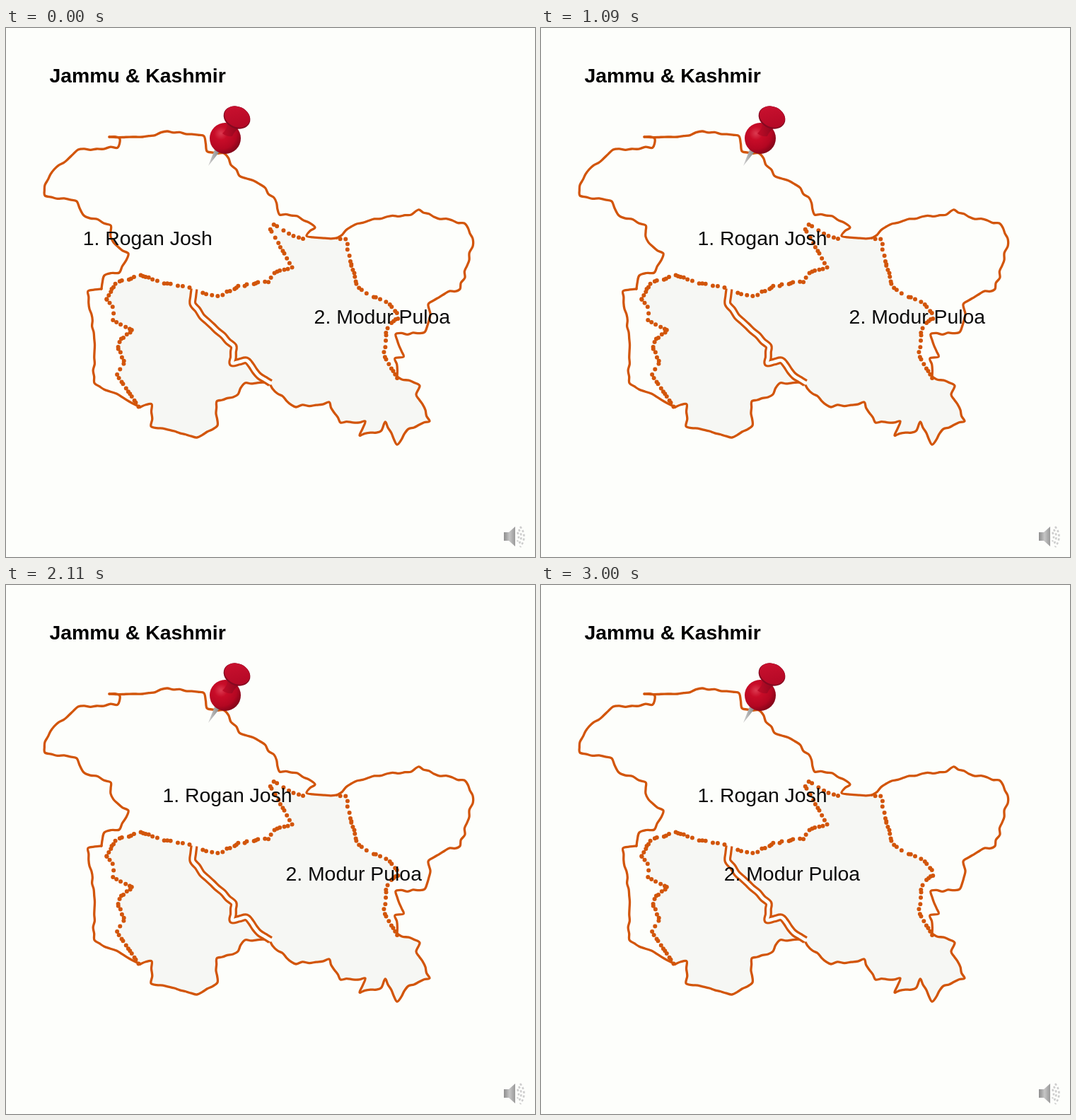
An HTML page for the animation above (3.03 s loop, 748 px wide and 748 px high).

```html
<!DOCTYPE html>
<html lang="en">
<head>
<meta charset="utf-8">
<title>Map labels</title>
<style>
  html, body { margin: 0; width: 100%; height: 100%; overflow: hidden; background: #fdfefb; }
  svg { display: block; width: 100vw; height: 100vh; }
  text { font: 28.4px "Liberation Sans", Arial, sans-serif; fill: #0b0b0b; }
  .title { font-weight: bold; fill: #000; }
  .line, .dots { fill: none; stroke: #d2550a; stroke-linejoin: round; stroke-linecap: round; }
  .line { stroke-width: 3.3; }
  .dots { stroke-width: 6; }
  .bank { stroke-width: 11; stroke-linecap: butt; }
  .water { stroke: #fdfefb; stroke-width: 4.6; }
  .land { fill: #f6f7f4; }
</style>
</head>
<body>
<svg viewBox="0 0 748 748">
  <defs>
    <radialGradient id="ball" cx=".36" cy=".34" r=".72">
      <stop offset="0" stop-color="#dc3a50"/>
      <stop offset=".3" stop-color="#c80c28"/>
      <stop offset=".7" stop-color="#b40722"/>
      <stop offset="1" stop-color="#7d0418"/>
    </radialGradient>
    <linearGradient id="cap" x2="1" y2="1">
      <stop offset="0" stop-color="#cc1230"/>
      <stop offset="1" stop-color="#b00724"/>
    </linearGradient>
    <linearGradient id="neck">
      <stop offset="0" stop-color="#c00c28"/>
      <stop offset="1" stop-color="#8d061d"/>
    </linearGradient>
    <linearGradient id="metal">
      <stop offset="0" stop-color="#d2d2d2"/>
      <stop offset="1" stop-color="#858585"/>
    </linearGradient>
    <linearGradient id="horn">
      <stop offset="0" stop-color="#8d8d8d"/>
      <stop offset=".5" stop-color="#c6c6c6"/>
      <stop offset="1" stop-color="#999"/>
    </linearGradient>
  </defs>

  <g id="map"></g>

  <g id="pin">
    <path d="M295 172L302 175L286 195Z" fill="url(#metal)"/>
    <circle cx="310" cy="156" r="22" fill="url(#ball)"/>
    <path d="M313 134L330 141Q322 147 320 153Q311 154 306 149Q313 143 313 134Z" fill="url(#neck)"/>
    <g transform="rotate(24 326.5 126.5)">
      <ellipse cx="326.5" cy="126.5" rx="19.5" ry="15.5" fill="#850820"/>
      <ellipse cx="326.5" cy="125.5" rx="18.5" ry="14.3" fill="url(#cap)"/>
    </g>
  </g>

  <g id="speaker">
    <path d="M704 713H711L720 705V733L711 725H704Z" fill="url(#horn)"/>
    <g fill="none" stroke="#cdcdcd" stroke-width="2.6" stroke-dasharray="3 3">
      <path d="M723 713Q727 719 723 726"/>
      <path d="M725 709Q732 719 725 730"/>
      <path d="M727 705Q738 719 727 734"/>
    </g>
  </g>

  <text class="title" x="61.5" y="77">Jammu &amp; Kashmir</text>
  <text id="first" y="307">1. Rogan Josh</text>
  <text id="second" y="418">2. Modur Puloa</text>
</svg>

<script>
const LOOP = 3030, STEP = 33, GLIDE = 1820, SHIFT = 190;

let seed = 7;
function random() {
  seed = (seed * 16807) % 2147483647;
  return seed / 2147483647;
}
const points = text => text.trim().split(/\s+/).map(p => p.split(",").map(Number));

// splits each leg into short pieces and nudges them sideways
function rough(text, wobble = 3.6) {
  const keys = points(text), out = [keys[0]];
  for (let i = 1; i < keys.length; i++) {
    const [x, y] = keys[i - 1], [dx, dy] = [keys[i][0] - x, keys[i][1] - y];
    const length = Math.hypot(dx, dy), count = Math.max(1, Math.round(length / 9));
    for (let k = 1; k < count; k++) {
      const u = k / count, side = (random() - .5) * wobble / length;
      out.push([x + dx * u - dy * side, y + dy * u + dx * side]);
    }
    out.push(keys[i]);
  }
  return out;
}

// Catmull-Rom curve as cubic Beziers
function curve(list) {
  let d = "M" + list[0];
  for (let i = 0; i < list.length - 1; i++) {
    const a = list[i], b = list[i + 1];
    const before = list[i - 1] || a, after = list[i + 2] || b;
    const c1 = a.map((v, k) => v + (b[k] - before[k]) / 6);
    const c2 = b.map((v, k) => v - (after[k] - a[k]) / 6);
    d += `C${c1} ${c2} ${b}`;
  }
  return d;
}

// beads at uneven distances along straight legs
function beads(list) {
  let d = "", gap = 0;
  for (let i = 1; i < list.length; i++) {
    const [x, y] = list[i - 1], [dx, dy] = [list[i][0] - x, list[i][1] - y];
    const length = Math.hypot(dx, dy);
    for (; gap < length; gap += 3 + random() * 7) {
      const u = gap / length, shake = random() * 2 - 1;
      d += `M${x + dx * u + shake} ${y + dy * u + shake}h.01`;
    }
    gap -= length;
  }
  return d;
}

const map = document.getElementById("map");
function draw(d, cls) {
  const path = document.createElementNS("http://www.w3.org/2000/svg", "path");
  path.setAttribute("d", d);
  path.setAttribute("class", cls);
  map.append(path);
}
const area = (...parts) => "M" + parts.flat().join(" ") + "Z";

const west = rough(`146,154 161,157 158,169 128,171 102,172 88,185 68,200 55,222 55,237 100,245 110,265
  148,279 148,295 158,309 173,319 160,346 139,350 135,369`);
const southWest = rough("135,369 116,372 124,430 125,502 147,514 174,528 190,536");
const south = rough(`372,501 338,502 328,518 298,528 299,562 270,579 238,570 205,563 206,532 190,536`);
const north = rough(`146,154 193,154 228,146 280,153 284,174 308,177 330,209 359,221 379,240 387,264
  412,266 437,282 425,294 468,297`);
const east = rough(`468,297 488,281 538,267 573,264 583,257 605,267 648,276 660,298 655,328 642,369
  620,376 597,391 600,404 592,430 551,433 562,465 550,467 553,493`);
const southEast = rough(`372,501 384,517 410,536 457,529 473,558 508,556 500,576 531,569 536,557 553,589
  569,567 599,556 580,518 585,506 553,493`);
const river = rough("266,369 264,390 277,408 307,435 322,450 320,474 340,470 358,492 374,502", 2);

const eastTrail = points(`553,495 535,464 537,426 557,408 540,388 512,377 497,366 482,310 482,298
  468,299`);
const notchTrail = points("420,298 404,293 376,276");
const northTrail = points("374,285 404,338 378,346 373,358 330,365 300,379 277,375");
const westTrail = points("188,536 156,490 167,472 156,446 179,428 151,413 152,396 142,383");
const topTrail = points("142,383 156,361 190,349 220,360 262,367");

draw(area(river, south, westTrail, topTrail), "land");
draw(area(river, southEast, eastTrail, notchTrail, northTrail), "land");
for (const coast of [west, southWest, south, north, east, southEast]) draw(curve(coast), "line");
draw(curve(river), "line bank");
draw(curve(river), "line water");
for (const trail of [eastTrail, notchTrail, northTrail, westTrail, topTrail]) draw(beads(trail), "dots");

// constant acceleration, then equal deceleration
function ease(u) {
  u = Math.min(1, Math.max(0, u));
  return u < .5 ? 2 * u * u : 1 - 2 * (1 - u) ** 2;
}
const first = document.getElementById("first");
const second = document.getElementById("second");
function render() {
  const now = performance.now() % LOOP;
  const t = Math.floor((now + 5) / STEP) * STEP;
  first.setAttribute("x", 31.5 + SHIFT * ease((t + 820) / GLIDE));
  second.setAttribute("x", 435.6 - SHIFT * ease((t - 1520) / GLIDE));
  requestAnimationFrame(render);
}
render();
</script>
</body>
</html>
```
